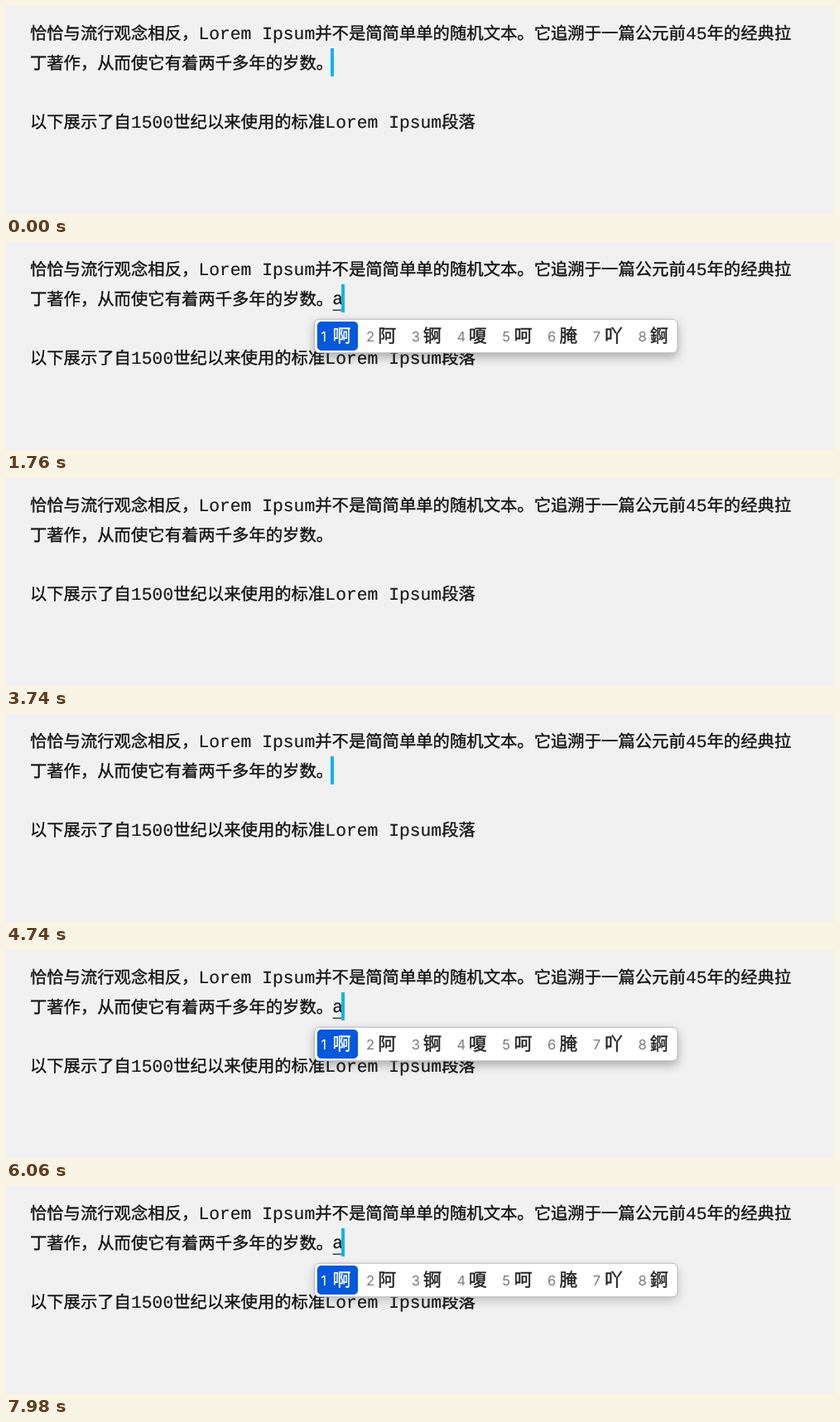
Recreate the animation shown at these times as an HTML page. Size 1000x251 px, loop 8000 ms.

```html
<!DOCTYPE html>
<html lang="zh-CN">
<head>
<meta charset="utf-8">
<title>Pinyin input</title>
<style>
  html, body { margin: 0; width: 100%; height: 100%; overflow: hidden; background: #f1f1f1; }
  svg { display: block; width: 1000px; height: 251px; }
  text { white-space: pre; text-rendering: geometricPrecision; }
  .cjk { font: 20.35px "Noto Sans CJK SC", "Noto Sans CJK", sans-serif; fill: #141414; stroke: #141414; stroke-width: .4px; }
  .mono { font: 21.33px "Liberation Mono", monospace; fill: #1a1a1a; stroke: #1a1a1a; stroke-width: .2px; }
  .num { font: 16.5px Inter, sans-serif; fill: #7b7b7b; }
  .word { font: 22px "Noto Sans CJK SC", "Noto Sans CJK", sans-serif; fill: #222; stroke: #222; stroke-width: .4px; }
  .picked { fill: #fff; stroke: #fff; }
  .num.picked { stroke: none; }
</style>
</head>
<body>
<svg viewBox="0 0 1000 251">
  <g id="page"></g>
  <g id="typed">
    <text class="mono" x="394.2" y="75.4">a</text>
    <rect x="394.5" y="81.5" width="11.5" height="1.5" fill="#444"/>
  </g>
  <rect id="caret" y="51" width="4" height="34" fill="#15b2ec"/>
  <g id="popup">
    <rect id="panel" x="372.5" y="93.2" width="438.5" height="40.6" rx="6" fill="#fff" stroke="#b9b9b9"/>
    <rect x="375.8" y="96" width="49.2" height="35" rx="5" fill="#0358dc"/>
  </g>
</svg>
<script>
const LOOP = 8000, CJK = 20.35, MONO = 12.8, LEFT = 28.9;
const LINES = [
  [39.6, "恰恰与流行观念相反，Lorem Ipsum并不是简简单单的随机文本。它追溯于一篇公元前45年的经典拉"],
  [75.5, "丁著作，从而使它有着两千多年的岁数。"],
  [147.2, "以下展示了自1500世纪以来使用的标准Lorem Ipsum段落"]
];
const WORDS = "啊阿锕嗄呵腌吖錒";
// Typing spans: key pressed, candidates open, both dismissed.
const TYPING = [[1580, 1640, 3080], [5740, 5780, 6920], [7880, 7960, LOOP]];
const CARET_OFF = [[560, 1220], [2220, 2880], [3740, 4380], [5040, 5680], [6380, 6920], [7560, 7880]];

const el = id => document.getElementById(id);

function addText(parent, cls, x, y, str) {
  const t = document.createElementNS("http://www.w3.org/2000/svg", "text");
  t.setAttribute("class", cls);
  t.setAttribute("x", x);
  t.setAttribute("y", y);
  t.textContent = str;
  parent.appendChild(t);
}

for (const [y, line] of LINES) {
  let x = LEFT;
  for (const run of line.match(/[ -~]+|[^ -~]+/g)) {
    const latin = /^[ -~]/.test(run);
    addText(el("page"), latin ? "mono" : "cjk", x, y, run);
    x += run.length * (latin ? MONO : CJK);
  }
}

[...WORDS].forEach((word, i) => {
  const x = 380.3 + i * 54.75, picked = i ? "" : " picked";
  addText(el("popup"), "num" + picked, x, 119.8, i + 1);
  addText(el("popup"), "word" + picked, x + 14.2, 121, word);
});

const show = (id, on) => el(id).setAttribute("visibility", on ? "visible" : "hidden");

function draw(t) {
  const span = TYPING.find(([from, , to]) => t >= from && t < to);
  const age = span ? t - span[1] : -1;
  show("typed", span);
  show("popup", age >= 0);
  show("caret", !CARET_OFF.some(([from, to]) => t >= from && t < to));
  el("caret").setAttribute("x", span ? 405 : 392);
  const shade = .16 + .12 * Math.min(1, Math.max(0, age / 120));
  el("panel").style.filter = `drop-shadow(0 5px 6px rgba(0,0,0,${shade.toFixed(3)}))`;
}

const start = performance.now();
function tick() {
  draw((performance.now() - start) % LOOP);
  requestAnimationFrame(tick);
}
tick();
</script>
</body>
</html>
```
